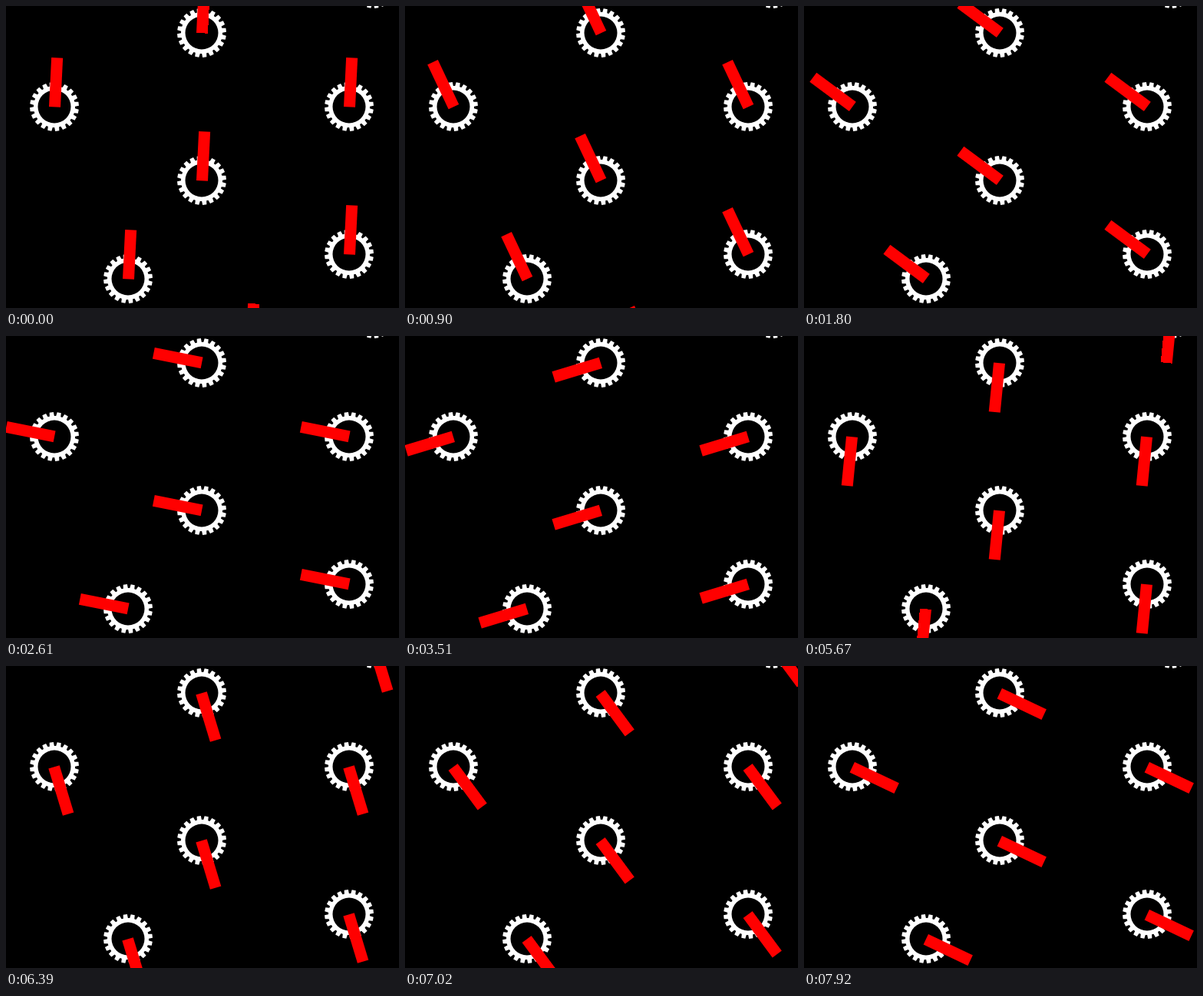
An HTML page for the animation above (8000 ms loop, 512 px wide and 393 px high).

```html
<!DOCTYPE html>
<html lang="en">
<head>
<meta charset="utf-8">
<title>Rotating gear arms</title>
<style>
  html, body { margin: 0; width: 100%; height: 100%; overflow: hidden; background: #000; }
  svg { display: block; width: 512px; height: 393px; }
  .gear { fill: #fff; fill-rule: evenodd; }
  .arm {
    fill: #f00;
    shape-rendering: crispEdges;
    transform-origin: 0 0;
    animation: turn 8s infinite;
  }
  /* 88 steps of 1/128 turn, 90 ms apart; the last pose holds for 80 ms */
  @keyframes turn {
    0% { transform: rotate(2.8125deg); animation-timing-function: steps(88, end); }
    99%, 100% { transform: rotate(-244.6875deg); }
  }
</style>
</head>
<body>
<svg id="stage" viewBox="0 0 512 393"></svg>
<script>
  const TEETH = 20, PHASE = 0.625, TIP = 32, ROOT = 27, HOLE = 21.5;
  const centers = [
    [255, 35], [479, -29], [63, 131], [447, 131],
    [255, 227], [447, 323], [159, 355], [319, 451]
  ];

  const polar = (radius, turn) => {
    const a = turn * 2 * Math.PI;
    return `${(radius * Math.cos(a)).toFixed(2)} ${(radius * Math.sin(a)).toFixed(2)}`;
  };

  function gearPath() {
    const points = [];
    for (let i = 0; i < TEETH; i++) {
      const at = offset => (i + PHASE + offset) / TEETH;
      points.push(polar(ROOT, at(-0.36)), polar(TIP, at(-0.26)),
                  polar(TIP, at(0.26)), polar(ROOT, at(0.36)));
    }
    const hole = `M${-HOLE} 0a${HOLE} ${HOLE} 0 1 0 ${2 * HOLE} 0a${HOLE} ${HOLE} 0 1 0 ${-2 * HOLE} 0Z`;
    return `M${points.join('L')}Z${hole}`;
  }

  const gear = gearPath();
  document.getElementById('stage').innerHTML = centers.map(([x, y]) => `
    <g transform="translate(${x} ${y})">
      <path class="gear" d="${gear}"/>
      <g transform="translate(0 .3)"><rect class="arm" x="-7.5" y="-64" width="15" height="64"/></g>
    </g>`).join('');
</script>
</body>
</html>
```
